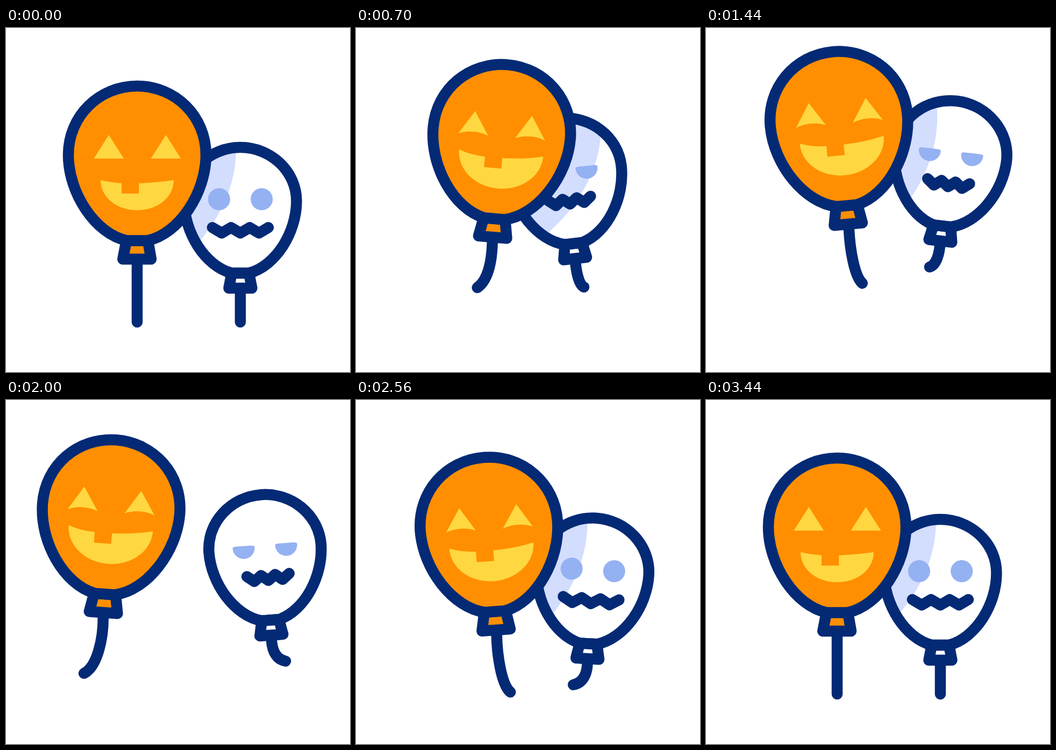
Animation, 640 px wide and 640 px high, one loop 3.6 s. Source, as an HTML page:

```html
<!DOCTYPE html>
<html lang="en">
<head>
<meta charset="utf-8">
<title>Halloween balloons</title>
<style>
html, body { margin: 0; width: 100%; height: 100%; overflow: hidden; background: #fff; }
svg { display: block; width: 100vw; height: 100vh; }
.line { fill: none; stroke: #042a75; stroke-width: 20.5; stroke-linecap: round; stroke-linejoin: round; }
.orange { fill: #ff8f00; }
.yellow { fill: #ffd740; }
.blue { fill: #94b1f2; }
.shade { fill: #d3ddfd; }
</style>
</head>
<body>
<svg viewBox="0 0 640 640">
  <defs>
    <path id="ghostBody" d="M436 222C379 222 331.5 267 331.5 322C331.5 380 370 443 420 456H452C502 443 540.5 380 540.5 322C540.5 267 493 222 436 222Z"/>
    <clipPath id="ghostClip"><use id="ghostMask" href="#ghostBody"/></clipPath>
  </defs>
  <g clip-path="url(#ghostClip)">
    <path id="shade" class="shade" d="M428 100V225C428 285 405 350 346 413H150V100Z"/>
  </g>
  <g id="ghost">
    <path id="ghostEyes" class="blue"/>
    <path id="ghostString" class="line"/>
    <use href="#ghostBody" class="line"/>
    <path class="line" d="M420 456L414.5 484H457.5L452 456Z"/>
    <path id="ghostMouth" class="line"/>
  </g>
  <g id="pumpkin">
    <path id="pumpkinString" class="line"/>
    <path class="line orange" d="M224 395.5L217.3 430H270L264 395.5Z"/>
    <path class="line orange" d="M244 108C173 108 116 164 116 236C116 307 166 383 225 395.5H263C322 383 372 307 372 236C372 164 315 108 244 108Z"/>
    <path id="pumpkinEyes" class="yellow"/>
    <path id="pumpkinMouth" class="yellow"/>
  </g>
</svg>
<script>
const LOOP = 3600;
const BEATS = [100, 500, 1400, 2040, 2600, 3440];
const $ = id => document.getElementById(id);

// Both balloons share the rise and the rhythm of the swing.
const swing = (...peaks) => [0, ...peaks, 0].map((v, i) => [BEATS[i], v]);
const LIFT = [[100, 0], [420, .185], [540, .4], [1020, .92], [1340, 1], [2700, 0]];

// x, y: the knot, about which the balloon tilts; slack: how far the string end is pulled up.
const pumpkin = {
  x: 244, y: 386, top: 54, bend: 90, length: 161, hook: 15, height: 66,
  tilt: swing(6.4, -5.4, 4.3, -4.2),
  curl: swing(-26, 16, -28.5, 18.5),
  drift: [[150, 0], [1260, 29], [2040, -60], [2600, 15], [3040, 0]],
  slack: [[200, 0], [560, 22], [1440, 5], [2560, 0]]
};
const ghost = {
  x: 436, y: 446, top: 40, bend: 61, length: 101, hook: 5, height: 89,
  tilt: swing(-8.3, 7, -4.4, 3.6),
  curl: swing(14, -14.5, 23, -24),
  drift: [[100, 0], [420, -24.5], [770, -33], [1440, 4.5], [2040, 55.5], [2600, -4], [3040, 0]],
  slack: [[100, 0], [1020, 12], [2560, 13], [3440, 0]]
};

// Smooth curve through [time, value] keys, flat at turning points and at both ends.
function curve(keys, t) {
  const last = keys.length - 1;
  if (t <= keys[0][0]) return keys[0][1];
  if (t >= keys[last][0]) return keys[last][1];
  const rate = j => (keys[j + 1][1] - keys[j][1]) / (keys[j + 1][0] - keys[j][0]);
  const slope = j => {
    if (j < 1 || j >= last) return 0;
    const a = rate(j - 1), b = rate(j);
    return a * b > 0 ? 2 * a * b / (a + b) : 0;
  };
  const i = keys.findIndex(k => k[0] > t) - 1;
  const [t0, v0] = keys[i], [t1, v1] = keys[i + 1];
  const h = t1 - t0, u = (t - t0) / h;
  return v0 + (v1 - v0) * u * u * (3 - 2 * u)
    + h * u * (1 - u) * ((1 - u) * slope(i) - u * slope(i + 1));
}

const ramp = (t, from, to) => curve([[from, 0], [to, 1]], t);
const setPath = (id, d) => $(id).setAttribute("d", d);

function place(b, t, ...ids) {
  const x = curve(b.drift, t), y = -b.height * curve(LIFT, t);
  for (const id of ids)
    $(id).setAttribute("transform", `translate(${x} ${y}) rotate(${curve(b.tilt, t)} ${b.x} ${b.y})`);
}

function stringPath(b, t) {
  const { x, y } = b, curl = curve(b.curl, t);
  const end = y + b.length - curve(b.slack, t);
  return `M${x} ${y + b.top}C${x - .1 * curl} ${y + b.bend} ${x + .12 * curl} ${end - b.hook} ${x + curl} ${end}`;
}

function pumpkinEye(x, m) {
  const y = 243 - 7.6 * m;
  return `M${x - 28} 243L${x} 199L${x + 28} 243C${x + 13} ${y} ${x - 12} ${y} ${x - 28} 243Z`;
}

function pumpkinMouth(m) {
  const l = 176 - 8.5 * m, r = 312 + 12.5 * m, y = 283 - 10.5 * m;
  const lip = 288.8 - 7 * m, notch = 308 - 6.5 * m, side = y + 32 + 6 * m;
  const shift = 1.6 * m;
  return `M${l} ${y}Q${l + 20} ${lip - 1} ${215 + shift} ${lip}V${notch}h32.3V${lip}Q${r - 34} ${lip - 1} ${r} ${y}`
    + `C${r} ${side} ${282 + 6 * m} 339 ${244 + shift} 339S${l} ${side} ${l} ${y}Z`;
}

function ghostEye(x, m) {
  const r = 20.5, k = 11.3, y = 318.5;
  const lid = y - r + 17 * m, side = y - k + 7.5 * m, wide = k + 6 * m;
  return `M${x - r} ${y}C${x - r} ${side} ${x - wide} ${lid} ${x} ${lid}S${x + r} ${side} ${x + r} ${y}`
    + `C${x + r} ${y + k} ${x + k} ${y + r} ${x} ${y + r}S${x - r} ${y + k} ${x - r} ${y}Z`;
}

function ghostMouth(m) {
  const step = 17.35 - 4.2 * m, x = 436 + 2 * m, y = 371.2 + .7 * m;
  const points = Array.from({ length: 7 }, (_, i) => `${x + (i - 3) * step} ${y + i % 2 * 10.3}`);
  return "M" + points.join("L");
}

function draw(t) {
  place(pumpkin, t, "pumpkin", "shade");
  place(ghost, t, "ghost", "ghostMask");
  setPath("pumpkinString", stringPath(pumpkin, t));
  setPath("ghostString", stringPath(ghost, t));

  const grin = ramp(t, 200, 620) - ramp(t, 2600, 3000);
  const lids = ramp(t, 200, 620) - ramp(t, 2050, 2500);
  setPath("pumpkinEyes", pumpkinEye(191.3, grin) + pumpkinEye(297.5, grin));
  setPath("pumpkinMouth", pumpkinMouth(grin));
  setPath("ghostEyes", ghostEye(396.5, lids) + ghostEye(475.8, lids));
  setPath("ghostMouth", ghostMouth(lids));
}

let start;
function tick(now) {
  start ??= now;
  draw((now - start) % LOOP);
  requestAnimationFrame(tick);
}
draw(0);
requestAnimationFrame(tick);
</script>
</body>
</html>
```
